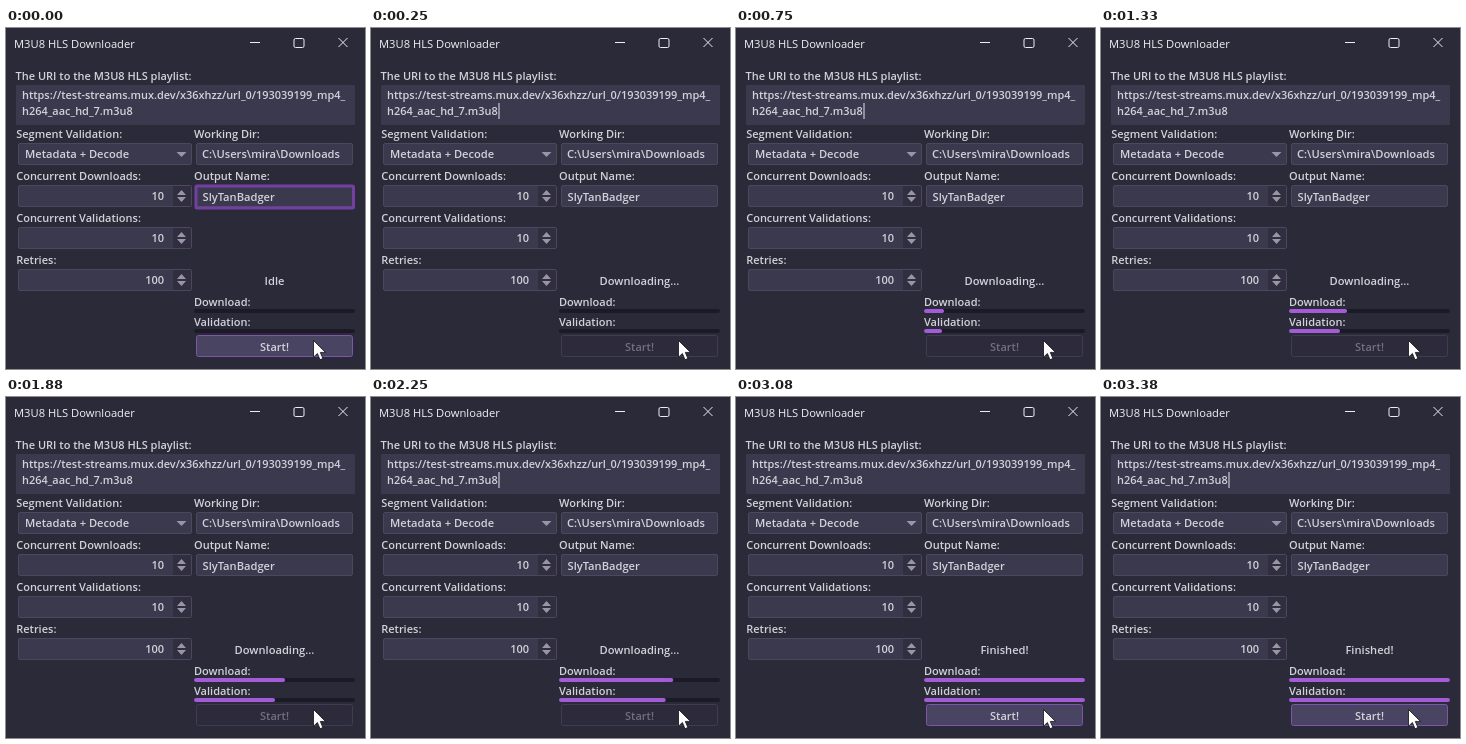
Write an HTML page that moves like this. It is 359 px wide and 341 px high and loops after 3.42 s.

```html
<!DOCTYPE html>
<html lang="en">
<head>
<meta charset="utf-8">
<title>M3U8 HLS Downloader</title>
<style>
html, body { margin: 0; width: 100%; height: 100%; overflow: hidden; background: #2a2a39; }
svg { display: block; width: 359px; height: 341px; }
text { font: 600 11px "Open Sans", "Noto Sans", sans-serif; fill: #d3d2d9; white-space: pre; }
.title { font-weight: 400; font-size: 11.2px; fill: #f1f0f4; }
.url { font-size: 10.94px; }
.value { font-size: 11.15px; }
.mid { text-anchor: middle; }
.end { text-anchor: end; }
.field { fill: #3b394e; stroke: #4b485e; }
.stepper { fill: #302e3f; }
.arrow { fill: #9896a6; }
.track { stroke: #1d1a27; }
.bar { stroke: #a45bd8; }
.track, .bar { stroke-width: 4; stroke-linecap: round; }
.chrome { fill: none; stroke: #eeedf2; }
#focus { fill: none; stroke: #7340a2; stroke-width: 3; }
#button { fill: #4a4463; stroke: #7e55a8; }
.off #button { fill: #2d2b3b; stroke: #403d50; }
.off #start { fill: #72707f; }
</style>
</head>
<body>
<svg viewBox="0 0 359 341">
  <rect width="359" height="341" fill="#2a2a39"/>
  <path class="chrome" d="M244 14.500h10M332.500 10l9 9m0-9l-9 9"/>
  <rect class="chrome" x="288" y="10.500" width="10" height="9" rx="1.500"/>
  <g id="form"></g>
  <rect id="focus" x="190" y="158" width="157.500" height="22" rx="1"/>
  <rect id="caret" x="127.500" y="75" width="1" height="16" fill="#e4e3e9"/>
  <text id="status" class="mid value" x="268.500" y="257"></text>
  <path class="track" d="M190 283H347M190 303H347"/>
  <path class="bar" id="download"/>
  <path class="bar" id="validation"/>
  <g id="action">
    <rect id="button" x="190.500" y="307.500" width="156" height="21" rx="2"/>
    <text id="start" class="mid" x="268.500" y="322.500">Start!</text>
  </g>
  <path d="M307.500 312.500v16.700l3.900-3.700 2.600 6.200 2.900-1.200-2.600-6.100h5.200z" fill="#fff" stroke="#111" stroke-width=".8"/>
</svg>
<script>
const LOOP = 3420, BEGIN = 180, DONE = 3060, BLINK = 650;
const LEFT = 188, RIGHT = 349;
const $ = id => document.getElementById(id);

// Each bar: [time, right edge]
const downloadSteps = [[430, LEFT], [750, 208], [1330, 246], [1880, 279], [2630, 326], [2990, RIGHT]];
const validationSteps = [[450, LEFT], [750, 206], [1330, 239], [1880, 269], [2630, 321], [3040, RIGHT]];

const label = (x, y, s, cls = '') => `<text x="${x}" y="${y}" class="${cls}">${s}</text>`;
const field = (x, y, w, h = 21) =>
  `<rect class="field" x="${x + .5}" y="${y + .5}" width="${w}" height="${h}" rx="1.5"/>`;
const spin = (y, value) => field(12, y, 173) + label(158, y + 15, value, 'end') +
  `<rect class="stepper" x="167" y="${y + 1}" width="18" height="20"/>` +
  `<path class="arrow" d="M171 ${y + 10}l4.500-5 4.500 5zM171 ${y + 12}l4.500 5 4.500-5z"/>`;

$('form').innerHTML = [
  label(8, 19.5, 'M3U8 HLS Downloader', 'title'),
  label(9.5, 52, 'The URI to the M3U8 HLS playlist:'),
  '<rect x="10" y="57" width="339" height="40" rx="1" fill="#3b394e"/>',
  label(16, 71, 'https://test-streams.mux.dev/x36xhzz/url_0/193039199_mp4_', 'url'),
  label(16, 87, 'h264_aac_hd_7.m3u8', 'url'),
  label(10.2, 110, 'Segment Validation:'),
  field(12, 115, 173),
  label(19, 130, 'Metadata + Decode', 'value'),
  '<path class="arrow" d="M170.500 124h10l-5 5z"/>',
  label(188, 110, 'Working Dir:'),
  field(190, 115, 156),
  label(196, 130, 'C:\\Users\\mira\\Downloads', 'value'),
  label(10.2, 152, 'Concurrent Downloads:'),
  spin(157, 10),
  label(188, 152, 'Output Name:'),
  field(190, 157, 156),
  label(196.5, 172.5, 'SlyTanBadger', 'value'),
  label(10.2, 194, 'Concurrent Validations:'),
  spin(199, 10),
  label(10.2, 236, 'Retries:'),
  spin(241, 100),
  label(188, 278, 'Download:'),
  label(188, 298, 'Validation:')
].join('');

function valueAt(steps, t) {
  if (t <= steps[0][0]) return steps[0][1];
  for (let i = 1; i < steps.length; i++) {
    const [t0, v0] = steps[i - 1], [t1, v1] = steps[i];
    if (t < t1) return v0 + (v1 - v0) * (t - t0) / (t1 - t0);
  }
  return steps[steps.length - 1][1];
}

function drawBar(id, y, edge) {
  const bar = $(id);
  bar.style.display = edge > LEFT ? '' : 'none';
  bar.setAttribute('d', `M${LEFT + 2} ${y}H${Math.max(LEFT + 2.01, edge - 2)}`);
}

function caretOn(t) {
  if (t < BEGIN) return false;
  return t < 1270 || Math.floor((t - 1270) / BLINK) % 2 === 1;
}

function draw() {
  const t = performance.now() % LOOP;
  const status = t < BEGIN ? 'Idle' : t < DONE ? 'Downloading...' : 'Finished!';
  if ($('status').textContent !== status) $('status').textContent = status;
  $('action').classList.toggle('off', t >= BEGIN && t < DONE);
  $('focus').style.display = t < BEGIN ? '' : 'none';
  $('caret').style.display = caretOn(t) ? '' : 'none';
  drawBar('download', 283, valueAt(downloadSteps, t));
  drawBar('validation', 303, valueAt(validationSteps, t));
  requestAnimationFrame(draw);
}
draw();
</script>
</body>
</html>
```
